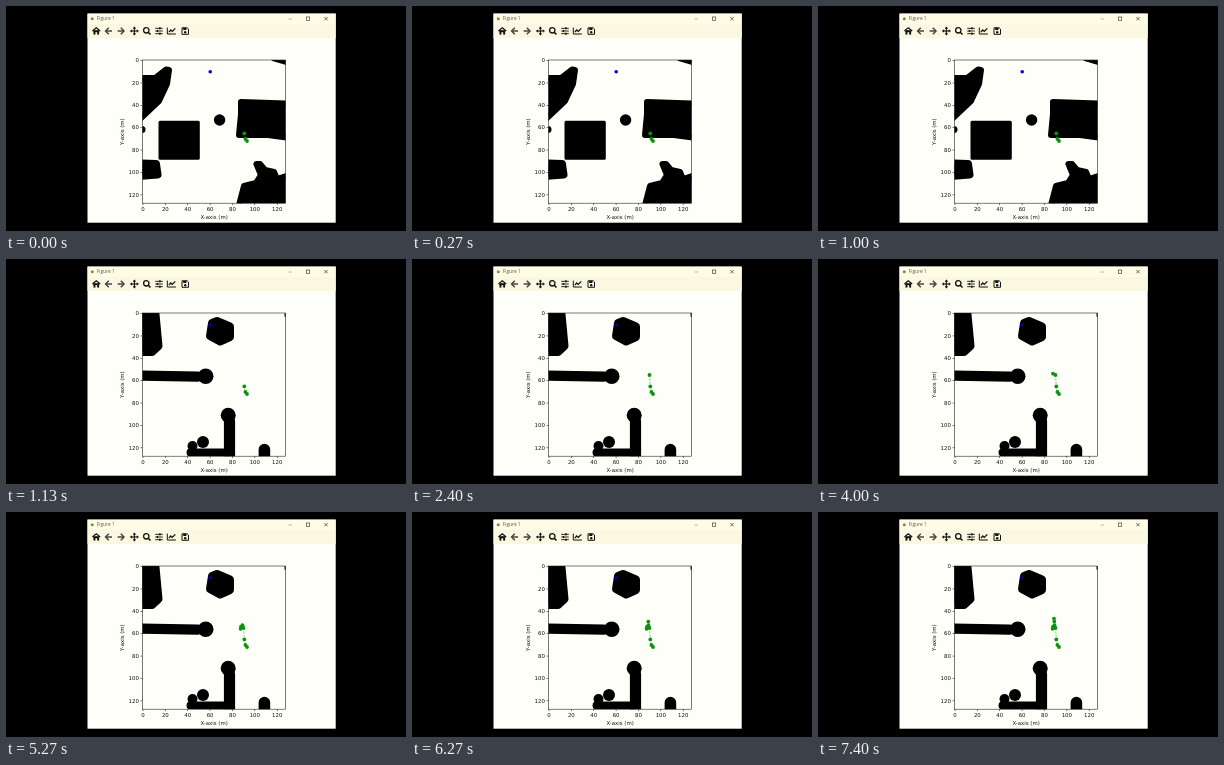
An HTML page with a canvas that plays this animation: 400x225 px, repeating every 8000 ms.

```html
<!DOCTYPE html>
<html lang="en">
<head>
<meta charset="utf-8">
<title>Path on an obstacle map</title>
<style>
html, body { margin: 0; width: 100%; height: 100%; overflow: hidden; background: #000; }
canvas { display: block; width: 100vw; height: 100vh; }
</style>
</head>
<body>
<canvas id="stage"></canvas>
<script>
const canvas = document.getElementById('stage');
const ctx = canvas.getContext('2d');
const LOOP = 8000, MAP_CHANGE = 1130;
const FIRST_STEP = 2200, STEP = 980, START_POINTS = 3;
const AX = { x: 136.4, y: 54, size: 143.2, range: 128 };
const INK = '#111', GREEN = '#0a940a';

// The last points are added one by one, at an even pace
const path = [
  [241, 135], [239.4, 133], [238.3, 127.4],
  [237.5, 116], [235, 114.7], [234.6, 116.8],
  [236.5, 113.2], [236.3, 109.6], [236, 106.6]
];

function rect(x, y, w, h, color) {
  ctx.fillStyle = color;
  ctx.fillRect(x, y, w, h);
}

function dot(x, y, r, color) {
  ctx.fillStyle = color;
  ctx.beginPath();
  ctx.arc(x, y, r, 0, Math.PI * 2);
  ctx.fill();
}

function trace(points) {
  ctx.beginPath();
  for (const [x, y] of points) ctx.lineTo(x, y);
}

function line(color, width, ...points) {
  trace(points);
  ctx.strokeStyle = color;
  ctx.lineWidth = width;
  ctx.stroke();
}

function at(x, y, drawIcon) {
  ctx.save();
  ctx.translate(x, y);
  drawIcon();
  ctx.restore();
}

function text(str, x, y, align = 'center') {
  ctx.textAlign = align;
  ctx.textBaseline = 'middle';
  ctx.fillText(str, x, y);
}

// A polygon, bar or point grown outward by r with round corners
function blob(r, ...points) {
  if (points.length === 1) return dot(...points[0], r, '#000');
  ctx.lineJoin = ctx.lineCap = 'round';
  trace(points);
  ctx.closePath();
  ctx.fillStyle = ctx.strokeStyle = '#000';
  ctx.lineWidth = 2 * r;
  ctx.fill();
  ctx.stroke();
}

function firstMap() {
  blob(3, [133, 72], [149, 72], [160, 63.5], [163, 64], [161, 78], [153, 95], [133, 114]);
  blob(3.5, [136, 123.5]);
  blob(1.5, [154, 116.2], [192.3, 116.2], [192.3, 152.2], [154, 152.2]);
  blob(5.7, [213.6, 114]);
  blob(3, [235, 96], [284, 97.5], [284, 132], [262, 129], [233, 129], [235, 108]);
  blob(4, [133, 157.5], [150, 158], [151.5, 168.5], [133, 170]);
  blob(3, [232.5, 201], [238, 180], [250, 177], [255, 169], [250.5, 158],
    [254, 158], [259, 164], [268, 166], [271, 173], [284, 169], [284, 201]);
  blob(2, [267, 53], [284, 58], [284, 50]);
}

function secondMap() {
  blob(4, [133, 50], [149, 50], [152.5, 87], [146, 93], [133, 93]);
  blob(5.2, [133, 116.6], [192, 117.6]);
  blob(7.8, [199.7, 117.2]);
  blob(4, [211, 62], [224, 67.5], [224, 78], [214, 82.5], [204, 77], [206, 64]);
  blob(5.6, [223.5, 162], [223.5, 202]);
  blob(7.5, [222.2, 156.3]);
  blob(4, [184.5, 193.5], [222, 193.5]);
  blob(5, [186.5, 187]);
  blob(6, [197, 183]);
  blob(5.8, [258.4, 190.5], [258.4, 202]);
  blob(1, [279.5, 50], [279.5, 57]);
}

function drawTitleBar() {
  rect(81.5, 7.6, 248.2, 10.4, '#fffce6');
  dot(86.3, 12.8, 1.5, '#8a8050');
  ctx.fillStyle = '#555';
  ctx.font = '4.8px "Open Sans", sans-serif';
  text('Figure 1', 90.8, 13, 'left');
  rect(282.5, 12.7, 3.5, 0.6, '#888');
  ctx.strokeStyle = '#444';
  ctx.lineWidth = 0.7;
  ctx.strokeRect(300.4, 11, 3.3, 3.3);
  at(320, 12.7, () => {
    for (const s of [-1, 1]) line('#333', 0.7, [-1.7, -1.7 * s], [1.7, 1.7 * s]);
  });
}

function arrow() {
  line('#444', 1.5, [-3.2, 0], [3.2, 0]);
  line('#444', 1.5, [0, -3.2], [3.2, 0], [0, 3.2]);
}

function fourArrows() {
  for (let i = 0; i < 4; i++) {
    ctx.rotate(Math.PI / 2);
    line(INK, 1.1, [0, 0], [3, 0]);
    line(INK, 1.1, [2.3, -1.1], [3.7, 0], [2.3, 1.1]);
  }
}

function home() {
  line(INK, 1.2, [-3.9, 0], [0, -3.3], [3.9, 0]);
  rect(-2.8, -0.8, 5.6, 2, INK);
  rect(-2.8, 0, 1.9, 3.6, INK);
  rect(0.9, 0, 1.9, 3.6, INK);
}

function lens() {
  ctx.strokeStyle = INK;
  ctx.lineWidth = 1.3;
  ctx.beginPath();
  ctx.arc(-0.7, -0.7, 2.7, 0, Math.PI * 2);
  ctx.stroke();
  line(INK, 1.6, [1.2, 1.2], [3.5, 3.5]);
}

function sliders() {
  for (let i = -1; i <= 1; i++) {
    rect(-3.8, 2.7 * i - 0.45, 7.6, 0.9, INK);
    rect((i ? 0.9 : -1.5) - 0.7, 2.7 * i - 1.1, 1.4, 2.2, INK);
  }
}

function chart() {
  line(INK, 1, [-4.2, -3.4], [-4.2, 3], [4.4, 3]);
  line(INK, 1.3, [-2.6, 1.2], [-0.8, -1], [0.8, 0.4], [3.8, -2.6]);
}

function floppy() {
  line(INK, 1, [-3.2, -3.2], [2, -3.2], [3.3, -1.9], [3.3, 3.3], [-3.2, 3.3], [-3.2, -3.2]);
  rect(-2, -3.2, 3.2, 2.2, INK);
  dot(0, 1.3, 1.2, INK);
}

function drawToolbar() {
  const y = 25;
  rect(81.5, 18, 248.2, 14, '#fbf8e2');
  ctx.lineJoin = 'miter';
  ctx.lineCap = 'butt';
  at(90.3, y, home);
  at(102.8, y, () => { ctx.scale(-1, 1); arrow(); });
  at(114.8, y, arrow);
  at(128.4, y, fourArrows);
  at(141, y, lens);
  at(153, y, sliders);
  at(165.5, y, chart);
  at(179.2, y, floppy);
}

function drawMap(shapes) {
  const { x, y, size } = AX;
  ctx.save();
  ctx.beginPath();
  ctx.rect(x, y, size, size);
  ctx.clip();
  shapes();
  ctx.restore();
}

function drawAxes() {
  const { x, y, size, range } = AX;
  ctx.strokeStyle = '#222';
  ctx.lineWidth = 0.6;
  ctx.strokeRect(x, y, size, size);
  ctx.font = '5.4px "DejaVu Sans", sans-serif';
  for (let v = 0; v <= 120; v += 20) {
    const d = (v + 0.5) * size / range;
    rect(x + d - 0.3, y + size, 0.6, 1.9, '#222');
    rect(x - 1.9, y + d - 0.3, 1.9, 0.6, '#222');
    ctx.fillStyle = INK;
    text(v, x + d, 203.4);
    text(v, x - 3.5, y + d + 0.3, 'right');
  }
  text('X-axis (m)', 208.1, 211.8);
  at(116.7, 125.6, () => {
    ctx.rotate(-Math.PI / 2);
    text('Y-axis (m)', 0, 0);
  });
}

function drawPath(t) {
  const added = Math.max(0, Math.floor((t - FIRST_STEP) / STEP) + 1);
  const shown = path.slice(0, START_POINTS + added);
  ctx.save();
  ctx.lineCap = 'butt';
  ctx.globalAlpha = 0.65;
  ctx.setLineDash([2.4, 1.1]);
  line(GREEN, 0.7, ...shown);
  ctx.restore();
  for (const [x, y] of shown) dot(x, y, 1.9, GREEN);
}

function draw(t) {
  const w = Math.round(innerWidth * devicePixelRatio);
  const h = Math.round(innerHeight * devicePixelRatio);
  if (canvas.width !== w || canvas.height !== h) {
    canvas.width = w;
    canvas.height = h;
  }
  ctx.setTransform(w / 400, 0, 0, h / 225, 0, 0);
  rect(0, 0, 400, 225, '#000');
  rect(81.5, 7.6, 248.2, 209.1, '#fffffa');
  drawTitleBar();
  drawToolbar();

  const changed = t >= MAP_CHANGE;
  drawMap(changed ? secondMap : firstMap);
  drawAxes();
  dot(204.2, 65.8, 1.8, changed ? '#0000a8' : '#0000f0');
  drawPath(t);
}

const start = performance.now();
function tick() {
  draw((performance.now() - start) % LOOP);
  requestAnimationFrame(tick);
}
tick();
</script>
</body>
</html>
```
